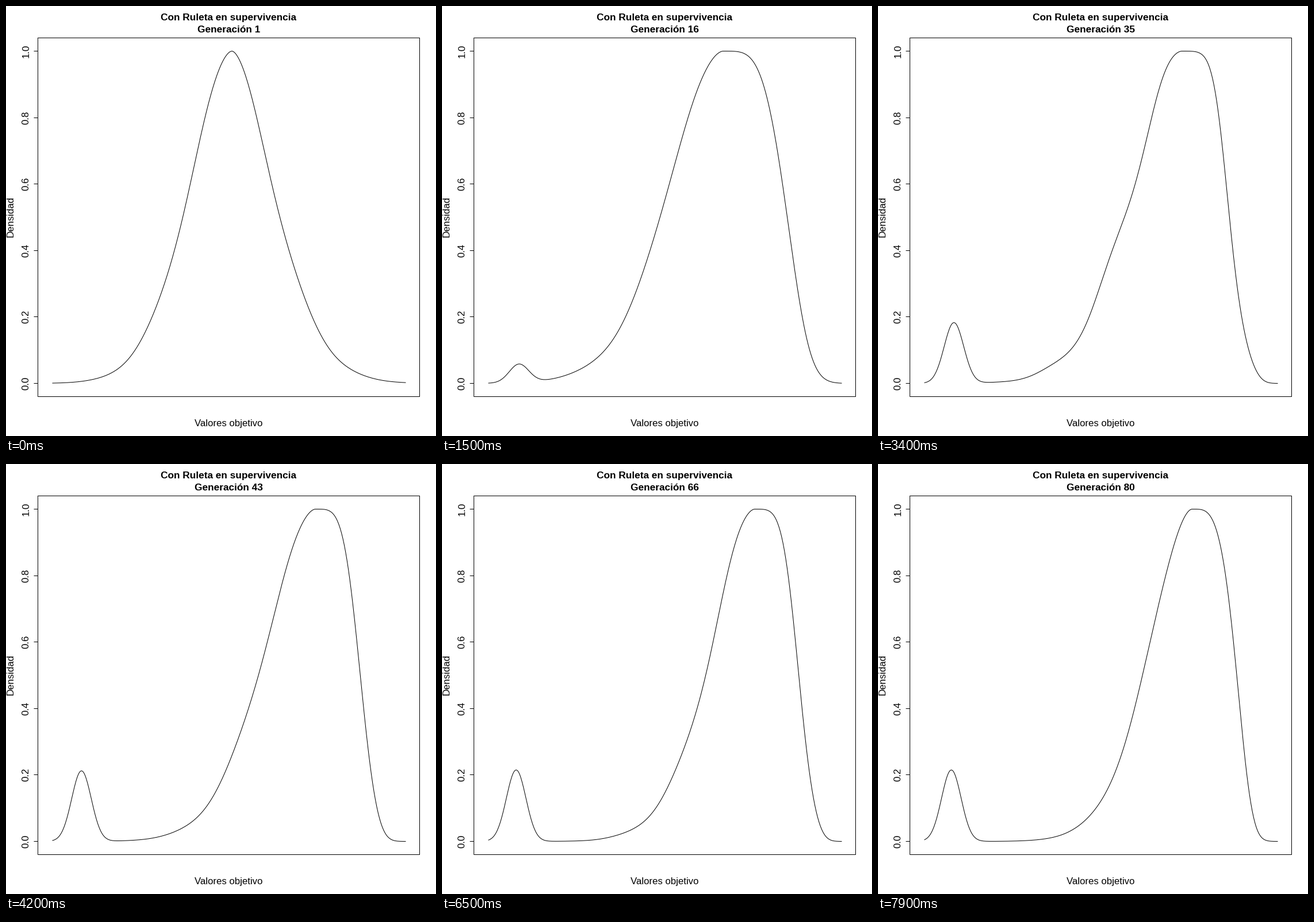
A matplotlib script that plays this animation: 748x748 px, repeating every 8 s.

```python
import matplotlib.pyplot as plt
import numpy as np
from matplotlib.animation import FuncAnimation

SIZE, DPI = 748, 64
PT = 72 / DPI                       # points per pixel
FRAMES, STEP = 80, 100
BASE, TOP = 656, 78                 # pixel rows of density 0 and 1
X = np.linspace(80, 695, 512)


def to_row(v):
    return BASE + (TOP - BASE) * v


def approach(start, end, t, tau):
    return end + (start - end) * np.exp(-t / tau)


def smoothstep(t):
    t = np.clip(t, 0, 1)
    return t * t * (3 - 2 * t)


def sway(t):
    """Sampling noise of one generation: a gentle sideways warp in pixels."""
    rng = np.random.default_rng(t)
    return sum(amp * rng.normal() * np.sin(2 * np.pi * (X / wave + rng.random()))
               for amp, wave in ((2, 240), (1.5, 110)))


def density(t):
    # the peak and both half-height points drift right and settle
    peak = approach(392, 548, t, 16)
    left = approach(306, 466, t, 24)
    right = 628 - 151 / (1 + .3 * t)

    u = X + sway(t) - peak
    half = np.where(u < 0, peak - left, right - peak)
    power = np.where(u < 0, 1.8, approach(1.7, 4, t, 5))   # the right flank steepens
    main = .5 ** (np.abs(u / half) ** power)

    # a small second mode grows on the left
    mode = np.exp(-.5 * ((X - 135 + .1 * t) / 17) ** 2)
    return main / main.max() + .215 * smoothstep(t / 45) * mode


fig = plt.figure(figsize=(SIZE / DPI, SIZE / DPI), dpi=DPI, facecolor="white")
ax = fig.add_axes([0, 0, 1, 1])
ax.set(xlim=(-.5, SIZE - .5), ylim=(SIZE - .5, -.5))
ax.axis("off")


def line(x, y):
    return ax.plot(x, y, color="black", lw=PT, solid_joinstyle="miter",
                   solid_capstyle="butt")[0]


def label(x, y, text, px=16.7, **kw):
    return ax.text(x, y, text, fontsize=px * PT, family="Liberation Sans", color="black",
                   ha="center", va="baseline", rotation_mode="anchor", **kw)


line([55, 719, 719, 55, 55], [55, 55, 679, 679, 55])
for v in np.arange(6) / 5:
    row = round(to_row(v))
    line([48, 55], [row, row])
    label(39, row, f"{v:.1f}", rotation=90)
label(387, 731, "Valores objetivo")
label(12, 366, "Densidad", rotation=90)
label(387, 24, "Con Ruleta en supervivencia", 17.25, weight="bold")
title = label(387, 45, "", 17.25, weight="bold")
curve = line([], [])


def draw(i):
    curve.set_data(X, to_row(density(i)))
    title.set_text(f"Generación {i + 1}")
    return curve, title


anim = FuncAnimation(fig, draw, frames=FRAMES, interval=STEP, repeat=True, repeat_delay=0)
plt.show()
```
